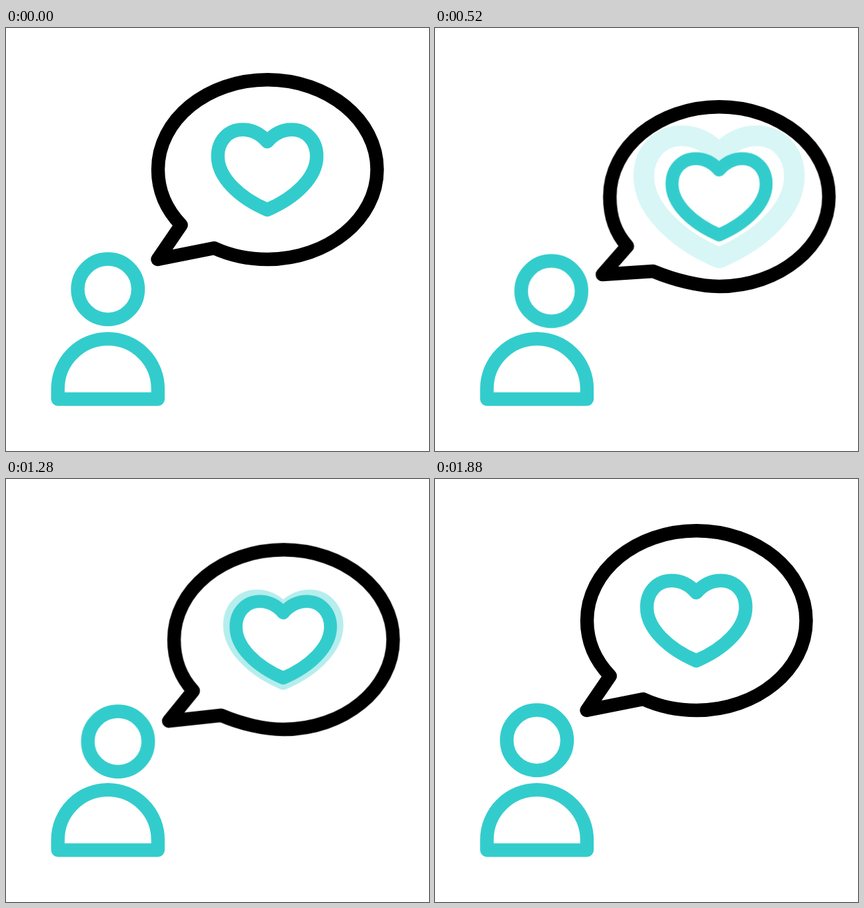
Write an HTML page without scripts that moves like this. It is 640 px wide and 640 px high and loops after 2 s.

```html
<!DOCTYPE html>
<html lang="en">
<head>
<meta charset="utf-8">
<title>Kind thoughts</title>
<style>
  html, body { margin: 0; width: 100%; height: 100%; overflow: hidden; background: #fff; }
  svg { display: block; width: 100%; height: 100%; }

  .line {
    fill: none;
    stroke: #33cccc;
    stroke-width: 20.5;
    stroke-linecap: round;
    stroke-linejoin: round;
  }

  .head, .talk, .bubble, .heart, .echo {
    animation: 2s cubic-bezier(.333, 0, .667, 1) infinite;
  }
  .head { animation-name: nod; }
  .talk { animation-name: drift; }
  .bubble { stroke: #000; animation-name: tail; }

  .heart, .echo { transform-origin: 395.3px 214.4px; animation-duration: 1s; }
  .heart { animation-name: beat; }
  .echo { animation-name: grow; }
  .fade { opacity: 0; animation: fade 1s linear infinite; }

  @keyframes nod {
    0%, 7.5%, 72.5%, 100% { transform: translate(0, 0); }
    20.5%, 59.25% { transform: translate(21.8px, 2.8px); }
  }
  @keyframes drift {
    0%, 7.5%, 72.5%, 100% { transform: translate(0, 0); }
    20.5%, 59.25% { transform: translate(34.5px, 41px); }
  }
  @keyframes tail {
    0%, 7.5%, 72.5%, 100% {
      d: path("M265 298C243 275 230 246 230 214.2C230 139 304 78.3 395.7 78.3C487 78.3 561.5 139 561.5 214.2C561.5 289 487 350 395.7 350C366 350 338 343.5 315 333L229.5 350Z");
    }
    20.5%, 59.25% {
      d: path("M256.5 289C238.5 269 230 246 230 214.2C230 139 304 78.3 395.7 78.3C487 78.3 561.5 139 561.5 214.2C561.5 289 487 350 395.7 350C366 350 328 340.5 295.5 327L218.8 332Z");
    }
  }
  @keyframes beat {
    0%, 18%, 45%, 69%, 100% { transform: scale(1); }
    32% { transform: scale(.945); }
    57.5% { transform: scale(.92); }
  }
  @keyframes grow {
    0%, 18% { transform: scale(1); }
    72%, 100% { transform: scale(1.755); }
  }
  @keyframes fade {
    0%, 17.9% { opacity: 0; }
    18% { opacity: .43; }
    68% { opacity: .08; }
    88%, 100% { opacity: 0; }
  }
</style>
</head>
<body>
<svg viewBox="0 0 640 640">
  <defs>
    <path id="heart" d="M395.3 172C384 159 371 153.8 358 153.8C336 153.8 320.5 171 320.5 194C320.5 226 353 257 395.3 275C437.6 257 470.1 226 470.1 194C470.1 171 454.6 153.8 432.6 153.8C419.6 153.8 406.6 159 395.3 172Z"/>
  </defs>

  <g class="line">
    <circle class="head" cx="154.2" cy="395.2" r="45.7"/>
    <path d="M78.5 561.5V546a75.7 75.7 0 0 1 151.4 0V561.5Z"/>

    <g class="talk">
      <path class="bubble" d="M265 298C243 275 230 246 230 214.2C230 139 304 78.3 395.7 78.3C487 78.3 561.5 139 561.5 214.2C561.5 289 487 350 395.7 350C366 350 338 343.5 315 333L229.5 350Z"/>
      <g class="fade"><use class="echo" href="#heart"/></g>
      <use class="heart" href="#heart"/>
    </g>
  </g>
</svg>
</body>
</html>
```
